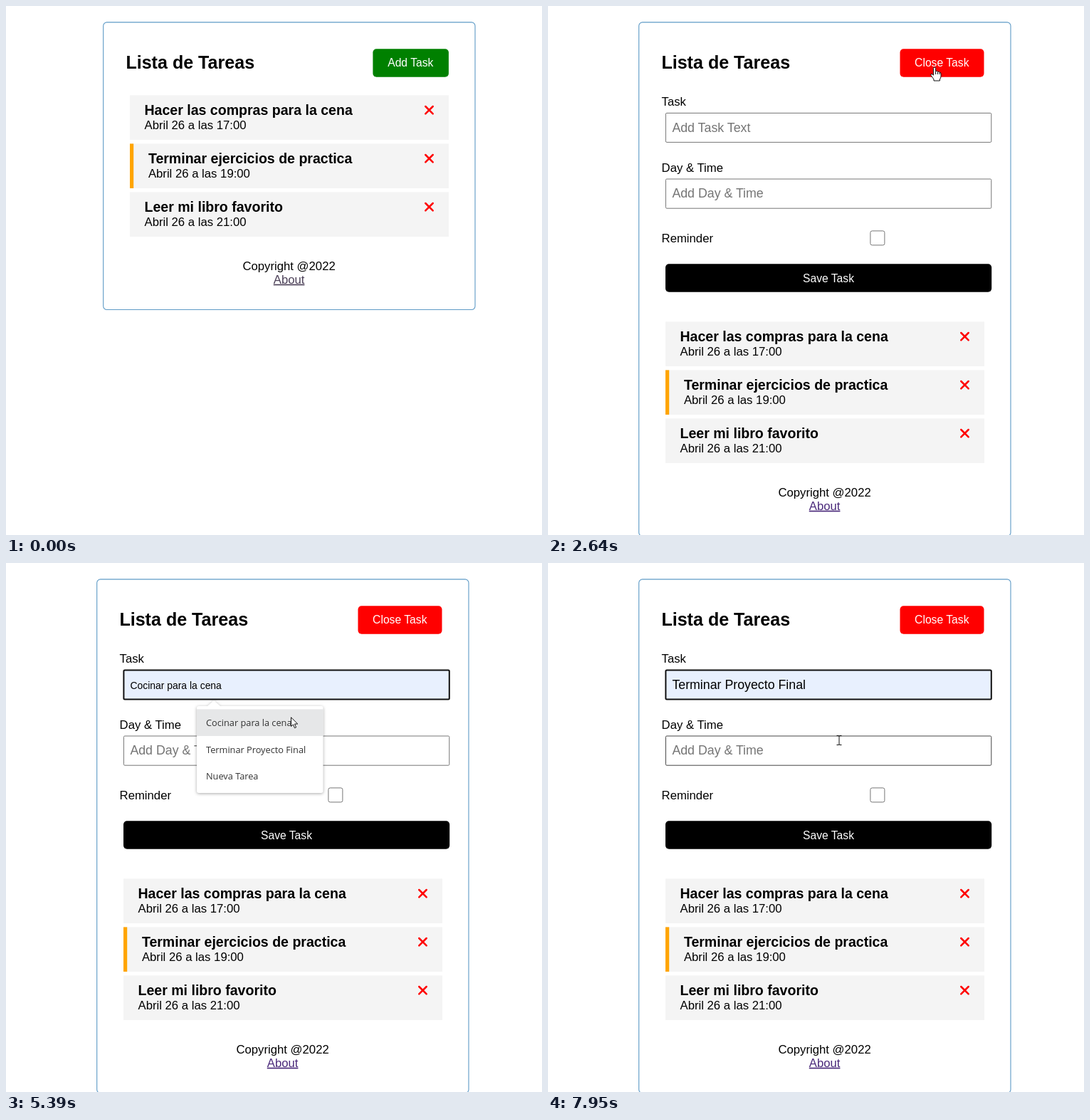
Recreate the animation shown at these times as an HTML page. Size 753x743 px, loop 8 s.

```html
<!DOCTYPE html>
<html lang="es">
<head>
<meta charset="utf-8">
<title>Lista de Tareas</title>
<style>
  html, body { margin: 0; height: 100%; overflow: hidden; background: #fff; }
  svg { display: block; width: 100vw; height: 100vh; font: 16.72px "Liberation Sans", Arial, sans-serif; }
  .title { font-size: 25.08px; font-weight: bold; }
  .task { font-size: 19.56px; font-weight: bold; }
  .button { font-size: 15.68px; fill: #fff; text-anchor: middle; }
  .field { fill: #fff; stroke: #767676; }
  .field.hover { stroke: #444; }
  .field.focus { stroke: #101010; stroke-width: 2; }
  .input { font-size: 17.77px; }
  .hint { fill: #757575; }
  .preview { font-size: 13.93px; }
  .menu text { font: 12.75px "Open Sans", "Noto Sans", sans-serif; fill: #333; }
  .menu { filter: drop-shadow(0 1px 2px #0005); }
  .cursor { fill: #fff; stroke: #111; stroke-linejoin: round; }
</style>
</head>
<body>
<svg viewBox="0 0 753 743">
  <rect id="card" y="22.9" width="522.3" rx="5" fill="#fff" stroke="#5d9ac6" stroke-width="1.1"/>
  <text id="title" class="title" y="88">Lista de Tareas</text>
  <rect id="toggle" y="60.3" height="39.4" rx="5"/>
  <text id="toggleLabel" class="button" y="84.5"></text>

  <g id="form">
    <text x="159.6" y="140.3">Task</text>
    <rect id="taskField" class="field" x="165.4" y="150.4" width="457.4" height="41" rx="1.5"/>
    <text id="taskText" x="174.4" y="177"></text>
    <text x="159.6" y="232.5">Day &amp; Time</text>
    <rect id="dayField" class="field" x="165.4" y="243" width="457.4" height="41.2" rx="1.5"/>
    <text class="input hint" x="174.4" y="269">Add Day &amp; Time</text>
    <text x="159.6" y="331.5">Reminder</text>
    <rect class="field" x="452.9" y="315.9" width="20" height="20" rx="2.5"/>
    <rect x="165" y="362.3" width="458.2" height="39.4" rx="5"/>
    <text class="button" x="394" y="387.5">Save Task</text>
  </g>

  <g id="list">
    <g id="rows"></g>
    <g text-anchor="middle">
      <text x="397.6" y="370.5">Copyright @2022</text>
      <text id="about" x="397.6" y="389.7" text-decoration="underline">About</text>
    </g>
  </g>

  <g id="menu" class="menu">
    <path d="M271 201H283L292 193L301 201H443Q445.5 201 445.5 204V320Q445.5 323 442.5 323H271Q268 323 268 320V204Q268 201 271 201Z" fill="#fff"/>
    <rect id="highlight" x="268" width="177.5" height="37.6" fill="#e6e7e8"/>
    <g id="options"></g>
  </g>

  <g id="cursor">
    <path id="arrow" class="cursor" d="M.5.5V13.2L3.4 10.5L5.5 15.4L7.6 14.5L5.5 9.7H9.7Z"/>
    <path id="hand" class="cursor" d="M-1.6 1.4Q-1.6 0 0 0T1.6 1.4V5.6Q3.6 4.6 4.4 6.3Q6.3 5.6 7 7.3Q9 7 9 9V12.6Q9 15 7.4 17V19H-1V17L-5 11.3Q-5.6 9.2-3.8 9.3L-1.6 11.2ZM1.6 6V10M4.4 6.6V10M7 7.5V10"/>
    <path id="beam" d="M-3.5-6.5H-1Q0-6.5 0-5.5Q0-6.5 1-6.5H3.5M0-5.5V5.5M-3.5 6.5H-1Q0 6.5 0 5.5Q0 6.5 1 6.5H3.5" fill="none" stroke="#111"/>
  </g>
</svg>
<script>
const LOOP = 8000, OPEN = 2420, FOCUS = 4910, PICK = 7400;
const TASKS = [
  ["Hacer las compras para la cena", "17:00"],
  ["Terminar ejercicios de practica", "19:00"],
  ["Leer mi libro favorito", "21:00"],
];
const OPTIONS = ["Cocinar para la cena", "Terminar Proyecto Final", "Nueva Tarea"];
const MENU_TOP = 205.4, OPTION_HEIGHT = 37.5;

// Pointer moves: start, end, steps, destination
const MOVES = [
  [520, 1270, 12, 601, 322],
  [1340, 1830, 8, 543, 86],
  [3170, 3910, 12, 476, 208],
  [3980, 4320, 5, 456, 250],
  [4580, 4710, 3, 403, 174],
  [5250, 5990, 11, 394, 302],
  [6060, 6540, 7, 398, 240],
  [6800, 7200, 6, 397, 260],
  [7400, 7950, 9, 409, 249],
];

const $ = id => document.getElementById(id);
const show = (id, visible) => $(id).setAttribute("display", visible ? "inline" : "none");
const set = (id, attributes) => {
  for (const name in attributes) $(id).setAttribute(name, attributes[name]);
};

$("rows").innerHTML = TASKS.map(([name, hour], i) => {
  const marked = i === 1, x = marked ? 199.9 : 194.5;
  return `<g transform="translate(0 ${i * 68})">
    <rect x="174" y="125.4" width="448" height="62.6" fill="#f4f4f4"/>
    ${marked ? '<rect x="174" y="125.4" width="5.2" height="62.6" fill="orange"/>' : ""}
    <text class="task" x="${x}" y="153.3">${name}</text>
    <text x="${x}" y="173.3">Abril 26 a las ${hour}</text>
    <path d="M589.3 141l10.4 10.4m0-10.4l-10.4 10.4" stroke="red" stroke-width="2.5" stroke-linecap="round"/>
  </g>`;
}).join("");
$("options").innerHTML = OPTIONS.map((name, i) =>
  `<text x="281" y="${229.3 + i * OPTION_HEIGHT}">${name}</text>`).join("");

function pointerAt(t) {
  let x = 724, y = 748;
  for (const [start, end, steps, toX, toY] of MOVES) {
    if (t < start) break;
    const step = Math.min(steps, 1 + Math.floor((t - start) / (end - start) * (steps - 1) + 1e-6));
    const eased = 1 - (1 - step / steps) ** 2;
    x += (toX - x) * eased;
    y += (toY - y) * eased;
  }
  return [x, y];
}

function draw(t) {
  const open = t >= OPEN, focused = t >= FOCUS, picked = t >= PICK;
  const menuOpen = focused && !picked;
  const [x, y] = pointerAt(t);
  const within = (left, top, right, bottom) => x >= left && x <= right && y >= top && y <= bottom;

  const shift = open ? -9 : 0;
  set("card", { x: 136.7 + shift, height: open ? 721.6 : 403.6 });
  set("title", { x: 168.4 + shift });
  set("toggle", { x: open ? 494.5 : 515.4, width: open ? 118 : 106.5, fill: open ? "red" : "green" });
  set("toggleLabel", { x: open ? 553.3 : 568.3 });
  $("toggleLabel").textContent = open ? "Close Task" : "Add Task";
  set("list", { transform: open ? "translate(-9 318)" : "" });
  set("about", { fill: open ? "#4b2a7b" : "#4c4058" });
  show("form", open);

  const option = menuOpen && within(268, MENU_TOP, 445, MENU_TOP + 3 * OPTION_HEIGHT)
    ? Math.min(2, Math.floor((y - MENU_TOP) / OPTION_HEIGHT)) : -1;
  const overMenu = menuOpen && within(268, 201, 445, 323);
  const overTask = open && within(165, 150, 623, 192);
  const overDay = open && !overMenu && within(165, 243, 623, 285);
  const value = picked ? OPTIONS[1] : OPTIONS[option];

  set("taskField", { class: "field" + (focused ? " focus" : overTask ? " hover" : "") });
  $("taskField").style.fill = value ? "#e8f0fe" : "#fff";
  set("dayField", { class: "field" + (overDay ? " hover" : "") });
  $("taskText").textContent = value || "Add Task Text";
  set("taskText", { class: !value ? "input hint" : picked ? "input" : "preview" });
  show("menu", menuOpen);
  show("highlight", option >= 0);
  set("highlight", { y: MENU_TOP + option * OPTION_HEIGHT });

  const overButton = within(open ? 494 : 515, 60, open ? 612 : 622, 100);
  const overInput = overTask || overDay;
  show("cursor", t >= MOVES[0][0]);
  set("cursor", { transform: `translate(${x} ${y})` });
  show("hand", overButton);
  show("beam", overInput);
  show("arrow", !overButton && !overInput);
}

const began = performance.now();
function tick() {
  draw((performance.now() - began) % LOOP);
  requestAnimationFrame(tick);
}
tick();
</script>
</body>
</html>
```
